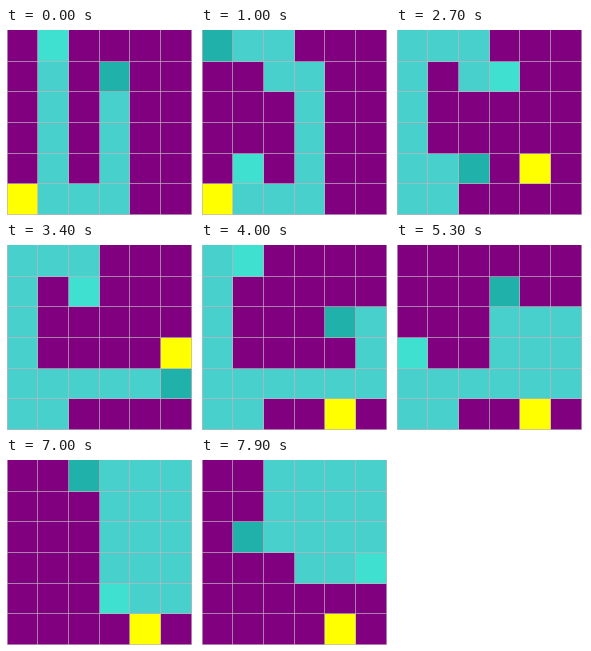
An HTML page with a canvas for the animation above (8 s loop, 189 by 187 pixels).

```html
<!DOCTYPE html>
<html lang="en">
<head>
<meta charset="utf-8">
<title>Snake</title>
<style>
  html, body { margin: 0; width: 100%; height: 100%; overflow: hidden; background: #fff; }
  canvas { display: block; width: 189px; height: 187px; }
</style>
</head>
<body>
<canvas id="stage" width="189" height="187"></canvas>
<script>
const ctx = document.getElementById('stage').getContext('2d');
const LOOP = 8000, SIZE = 6, PITCH = 30.7;
const lineX = col => Math.round(0.6 + col * PITCH);
const lineY = row => Math.round(1.9 + row * PITCH);

// The body at the start, tail first, then every later move of the head.
const START = 'DDDDDRRUUUU';
const MOVES = 'LULL' + 'DDDDDRUR' + 'RRRUUL' + 'DLUU' + 'RRU' + 'LLLDDL';
const MOVE_TIMES = [
  200, 400, 700, 1000, 1200, 1400, 1600, 1800, 2000, 2200, 2500, 2700,
  2900, 3100, 3300, 3500, 3800, 4000, 4200, 4500, 4900, 5200, 5400,
  5700, 6100, 6300, 6600, 7000, 7300, 7600, 7900
];
const MEALS = [9, 14, 15, 16]; // moves on which the snake eats and grows
const LAST_FOOD = [4, 5];

const STEP = { U: [0, -1], D: [0, 1], L: [-1, 0], R: [1, 0] };
const path = [[1, 0]];
for (const move of START + MOVES) {
  const [col, row] = path[path.length - 1];
  path.push([col + STEP[move][0], row + STEP[move][1]]);
}

// A cell lies under its right and bottom lines; the first ones reach the rim.
function fillCell([col, row], color) {
  const x = lineX(col) + (col > 0), y = lineY(row) + (row > 0);
  ctx.fillStyle = color;
  ctx.fillRect(x, y, lineX(col + 1) + 1 - x, lineY(row + 1) + 1 - y);
}

function drawGrid() {
  const x = lineX(0), y = lineY(0);
  const width = lineX(SIZE) + 1 - x, height = lineY(SIZE) + 1 - y;
  ctx.fillStyle = 'rgba(190, 180, 190, 0.7)';
  for (let i = 0; i <= SIZE; i++) {
    ctx.fillRect(lineX(i), y, 1, height);
    if (i > 0) ctx.fillRect(x, lineY(i), width, 1);
  }
}

function draw(time) {
  const moves = MOVE_TIMES.filter(t => t <= time).length;
  const eaten = MEALS.filter(meal => meal <= moves).length;
  const head = START.length + moves;
  const tail = moves - eaten;
  const food = eaten < MEALS.length ? path[START.length + MEALS[eaten]] : LAST_FOOD;

  ctx.clearRect(0, 0, 189, 187);
  for (let i = 0; i < SIZE * SIZE; i++) fillCell([i % SIZE, Math.floor(i / SIZE)], 'purple');
  fillCell(food, 'yellow');
  for (let i = tail + 1; i < head; i++) fillCell(path[i], 'mediumturquoise');
  fillCell(path[tail], 'turquoise');
  fillCell(path[head], 'lightseagreen');
  drawGrid();
}

const begin = performance.now();
function tick() {
  draw((performance.now() - begin) % LOOP);
  requestAnimationFrame(tick);
}
tick();
</script>
</body>
</html>
```
